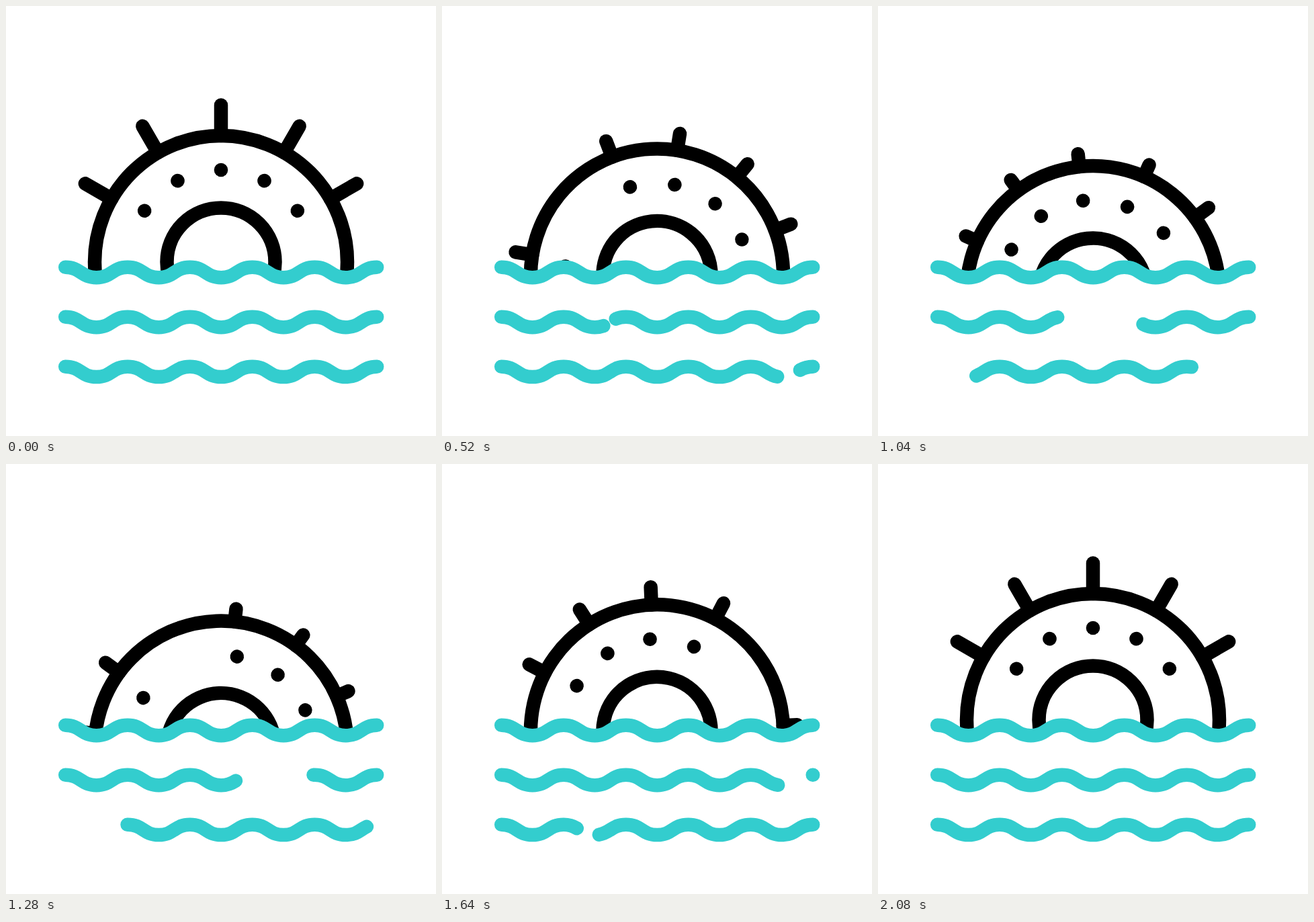
Write an HTML page that moves like this. It is 640x640 px and loops after 2120 ms.

```html
<!DOCTYPE html>
<html>
<head>
<meta charset="utf-8">
<style>
html, body { margin: 0; width: 100%; height: 100%; overflow: hidden; background: #fff }
svg { display: block; width: 100vw; height: 100vh }
.line { fill: none; stroke-width: 20.5; stroke-linecap: round }
</style>
</head>
<body>
<svg viewBox="0 0 640 640">
  <clipPath id="sky"><path id="skyShape"/></clipPath>
  <g clip-path="url(#sky)">
    <g id="sun" class="line" stroke="#000">
      <circle r="188"/>
      <circle r="80.5"/>
    </g>
  </g>
  <g id="sea" class="line" stroke="#33cdce"></g>
</svg>
<script>
const LOOP = 2120, STEP = 40, START = 60, SPAN = 2000, LENGTH = 464;
const $ = id => document.getElementById(id);

function add(parent, tag, attrs) {
  const el = document.createElementNS('http://www.w3.org/2000/svg', tag);
  for (const key in attrs) el.setAttribute(key, attrs[key]);
  return parent.appendChild(el);
}

const clamp = v => Math.min(1, Math.max(0, v));

// cubic-bezier(.42, 0, .58, 1), solved by bisection
function ease(v) {
  v = clamp(v);
  if (v === 0 || v === 1) return v;
  let lo = 0, hi = 1, s;
  for (let i = 0; i < 24; i++) {
    s = (lo + hi) / 2;
    const x = 3 * (1 - s) * s * (.42 * (1 - s) + .58 * s) + s ** 3;
    if (x < v) lo = s; else hi = s;
  }
  return s * s * (3 - 2 * s);
}

const swell = 'c23.2 0 23.2 15.4 46.4 15.4s23.2-15.4 46.4-15.4'.repeat(5);
const wave = y => add($('sea'), 'path', { d: `M88.2 ${y}${swell}`, pathLength: LENGTH });

$('skyShape').setAttribute('d', `M88.2 388.8${swell}H640V0H0V388.8Z`);
wave(388.8);

// head: start of the dash after the gap; the gap rises and falls linearly
const rows = [
  { el: wave(462.8), head: 51.2, speed: 522, rise: [414, -75.4], fall: [-361, 336.3] },
  { el: wave(536.7), head: 378, speed: 292.5, rise: [421, -63], fall: [-411, 357.7] }
];

// two mirrored groups of five rays and five dots
const sun = $('sun'), rays = [];
for (const half of [0, 180]) {
  for (let i = -2; i <= 2; i++) {
    const angle = half + i * 30;
    const el = add(sun, 'line', { y1: -188, transform: `rotate(${angle})` });
    rays.push({ el, short: half && i < 2 ? 207 : 213 });
    add(sun, 'circle', {
      cy: -137, r: 10.3, fill: '#000', stroke: 'none',
      transform: `rotate(${half + i * 28.1})`
    });
  }
}

function draw(time) {
  const p = clamp((time - START) / SPAN);
  const fold = Math.min(p, 1 - p);

  sun.setAttribute('transform',
    `translate(320 ${381 + 45 * ease(fold * 2)}) rotate(${360 * ease(p)})`);

  const shrink = ease((fold - .08) / .16);
  for (const { el, short } of rays) el.setAttribute('y2', -233.4 + (233.4 - short) * shrink);

  for (const { el, head, speed, rise, fall } of rows) {
    const gap = Math.max(0, Math.min(rise[0] * p + rise[1], fall[0] * p + fall[1]));
    el.setAttribute('stroke-dasharray', gap ? `${LENGTH - gap} ${gap}` : 'none');
    el.setAttribute('stroke-dashoffset', -(head + speed * p) % LENGTH);
  }
}

const origin = performance.now();
function tick() {
  const time = (performance.now() - origin) % LOOP;
  draw(Math.floor(time / STEP) * STEP);
  requestAnimationFrame(tick);
}
tick();
</script>
</body>
</html>
```
